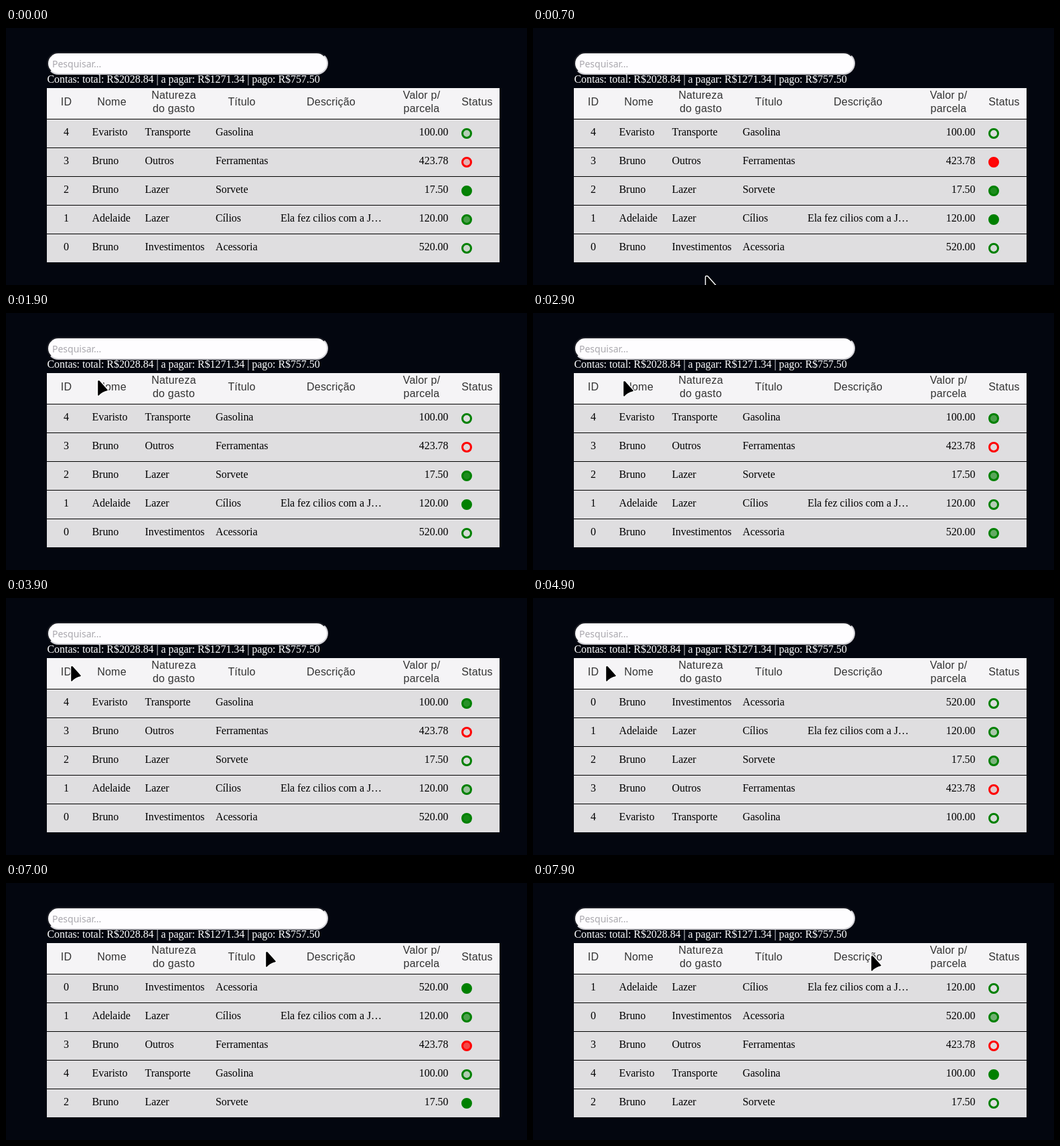
These frames come from a looping animation (778x385 px, 8000 ms). An HTML page:

```html
<!DOCTYPE html>
<html lang="pt">
<head>
<meta charset="utf-8">
<title>Contas</title>
<style>
html, body { margin: 0; width: 100%; height: 100%; overflow: hidden; background: #03060f; }
.search {
  position: absolute; left: 61px; top: 36px; width: 420px; height: 34px;
  box-sizing: border-box; padding-left: 6px; border: 2px solid;
  border-color: #1d1e25 #d2d1d6 #d2d1d6 #1d1e25; border-radius: 17px;
  background: #fefdff; color: #aaa8ae; font: 14px/31px "Noto Sans", sans-serif;
}
svg { position: absolute; left: 0; top: 0; }
text { font: 16px "Liberation Serif", serif; letter-spacing: -.06px; white-space: pre; }
.head text { font-family: "Liberation Sans", sans-serif; letter-spacing: .2px; fill: #333; text-anchor: middle; }
.mid { text-anchor: middle; }
.end { text-anchor: end; }
</style>
</head>
<body>
<div class="search">Pesquisar...</div>
<svg id="stage" width="778" height="385" viewBox="0 0 778 385">
  <text x="61.5" y="82" fill="#fff">Contas: total: R$2028.84 | a pagar: R$1271.34 | pago: R$757.50</text>
  <rect x="61" y="90" width="676" height="46" fill="#f5f4f6"/>
  <rect x="61" y="136" width="676" height="215" fill="#dfdee0"/>
  <g class="head" id="head"></g>
  <path d="M61 136.5h676m-676 43h676m-676 43h676m-676 43h676m-676 43h676" stroke="#000"/>
  <g id="rows"></g>
  <g id="cursor" stroke-linejoin="round">
    <path id="arrow" d="M1 2V23Q5 18 14 15.5L2 2Z" stroke="#fff" stroke-width="4.5"/>
    <use href="#arrow" style="display:none"/>
    <path d="M1 2V23Q5 18 14 15.5L2 2Z" stroke="#000" stroke-width="1.6"/>
  </g>
</svg>
<script>
const LOOP = 8000, STEP = 100, ROW = 43;
const $ = id => document.getElementById(id);

function add(parent, tag, attrs, text = '') {
  const el = document.createElementNS('http://www.w3.org/2000/svg', tag);
  for (const key in attrs) el.setAttribute(key, attrs[key]);
  el.textContent = text;
  return parent.appendChild(el);
}

[['ID', 90], ['Nome', 158], ['Natureza|do gasto', 250.5], ['Título', 352],
 ['Descrição', 485.5], ['Valor p/|parcela', 620.5], ['Status', 703.5]]
  .forEach(([label, x]) => label.split('|').forEach((line, i, all) =>
    add($('head'), 'text', { x, y: all.length > 1 ? 106 + 20 * i : 116 }, line)));

// Indexed by ID
const bills = [
  ['Bruno', 'Investimentos', 'Acessoria', '', '520.00'],
  ['Adelaide', 'Lazer', 'Cílios', 'Ela fez cilios com a J…', '120.00'],
  ['Bruno', 'Lazer', 'Sorvete', '', '17.50'],
  ['Bruno', 'Outros', 'Ferramentas', '', '423.78'],
  ['Evaristo', 'Transporte', 'Gasolina', '', '100.00'],
].map(([name, kind, title, note, value], id) => {
  const row = add($('rows'), 'g', {});
  const cell = (x, text, cls = '') => add(row, 'text', { x, y: 161, class: cls }, text);
  cell(90, id, 'mid');
  cell(128.5, name);
  cell(207.5, kind);
  cell(313, title);
  cell(410, note);
  cell(660.5, value, 'end');
  const late = id === 3, color = late ? '#f00' : '#008000';
  const spot = { cx: 688, cy: 158, r: 6.5 };
  const glow = add(row, 'circle', { ...spot, fill: color });
  add(row, 'circle', { ...spot, fill: 'none', stroke: color, 'stroke-width': 3 });
  return { row, glow, period: late ? 500 : 600 };
});

// Each sorting restarts the pulses: phase (in turns, per ID) holds at time "at"
const sorts = [
  { from: 0, order: [4, 3, 2, 1, 0], at: 0, phase: [.4, -.19, -.05, .65, .36] },
  { from: 4600, order: [0, 1, 2, 3, 4], at: 5800, phase: [.03, .16, .23, .4, .06] },
  { from: 6500, order: [0, 1, 3, 4, 2], at: 7000, phase: [0, .2, 0, .81, .35] },
  { from: 7600, order: [1, 0, 3, 4, 2], at: 7900, phase: [.25, .5, .5, .55, 0] },
];

// time, x, y
const path = [
  [500, 262, 392], [700, 258, 371], [1200, 180, 220], [1700, 137, 100],
  [2800, 137, 101], [3500, 97, 101], [4800, 97, 101], [5400, 264, 99],
  [5900, 264, 100], [6400, 345, 104], [6700, 350, 104], [7000, 388, 102],
  [7200, 410, 103], [7600, 505, 108], [8000, 505, 108],
];

function pointer(t) {
  const n = path.findIndex(p => p[0] > t);
  if (n < 1) return path[0].slice(1);
  const [a, b] = [path[n - 1], path[n]];
  const u = (t - a[0]) / (b[0] - a[0]), k = u * u * (3 - 2 * u);
  return [1, 2].map(i => a[i] + (b[i] - a[i]) * k);
}

function draw(t) {
  const { order, at, phase } = sorts.filter(s => s.from <= t).pop();
  order.forEach((id, place) => {
    const { row, glow, period } = bills[id];
    const turn = phase[id] + (t - at) / period;
    row.setAttribute('transform', `translate(0 ${place * ROW})`);
    glow.setAttribute('opacity', .5 + .5 * Math.cos(2 * Math.PI * turn));
  });
  $('cursor').setAttribute('transform', `translate(${pointer(t).map(Math.round)})`);
}

const start = performance.now();
function tick() {
  const t = (performance.now() - start) % LOOP;
  draw(Math.floor(t / STEP) * STEP);
  requestAnimationFrame(tick);
}
tick();
</script>
</body>
</html>
```
